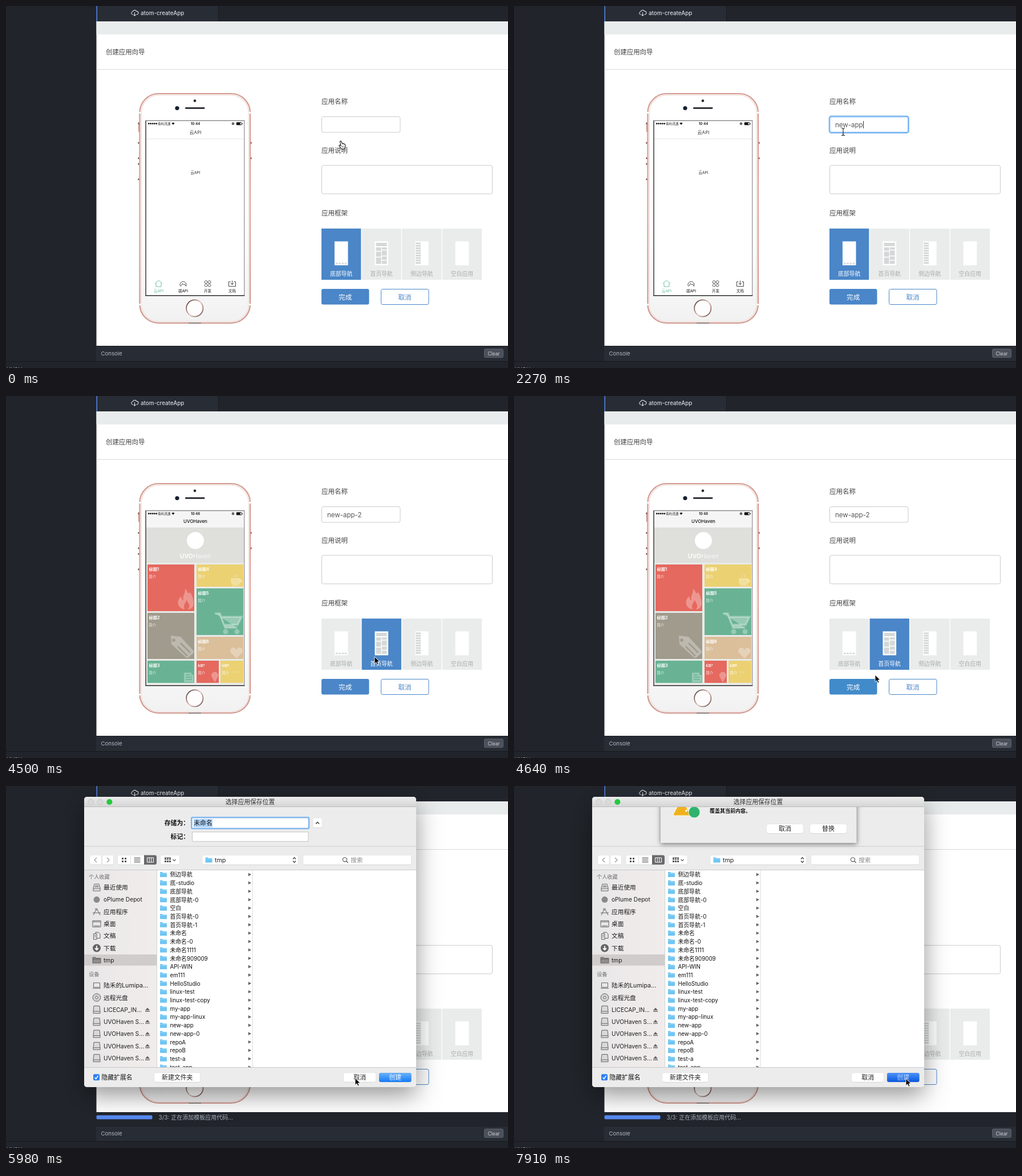
Animation, 880 px wide and 636 px high, one loop 8000 ms. Source, as an HTML page with a canvas:

```html
<!DOCTYPE html>
<html lang="zh-CN">
<head>
<meta charset="utf-8">
<title>创建应用向导</title>
<style>
html, body { margin: 0; width: 100%; height: 100%; overflow: hidden; background: #21252b; }
canvas { display: block; }
</style>
</head>
<body>
<canvas id="stage" width="880" height="636"></canvas>
<script>
const ctx = document.getElementById('stage').getContext('2d');
const LOOP = 8000;
const FONT = 'Inter, "Noto Sans CJK SC", "Noto Sans CJK", sans-serif';
const BLUE = '#4a86c8', GREEN = '#69b394', RED = '#e5695f', YELLOW = '#ebd172';
const BRAND = ['UVO', 'Haven'];
const NAME = BRAND.join('');

// Timed states: each entry holds until the next one starts.
const typed = [[0, ''], [620, 'ne'], [770, 'new'], [1370, 'new-'], [1820, 'new-a'],
  [1970, 'new-ap'], [2120, 'new-app'], [2720, 'new-app-'], [3020, 'new-app-2']];
const focus = [[0, ''], [330, 'name'], [3760, 'note'], [4340, ''], [5090, 'done']];
const pointer = [[0, 583, 237, 'hand'], [150, 577, 221, 'beam'], [3170, 580, 254, 'arrow'],
  [3310, 588, 297, 'beam'], [3460, 592, 322, 'beam'], [3760, 595, 359, 'arrow'],
  [3910, 604, 382, 'arrow'], [4060, 628, 418, 'arrow'], [4200, 648, 443, 'arrow'],
  [4490, 646, 458, 'arrow'], [4640, 633, 490, 'arrow'], [4790, 611, 512, 'arrow'],
  [5540, 612, 513, 'arrow'], [6430, 461, 87, 'beam'], [6730, 484, 128, 'arrow'],
  [6880, 535, 235, 'arrow'], [7020, 598, 365, 'arrow'], [7170, 648, 455, 'arrow'],
  [7310, 679, 503, 'arrow'], [7460, 687, 514, 'arrow']];
const progress = [[0, 0, ''], [5090, 64, '2/3: 正在创建应用目录...'],
  [5540, 84, '3/3: 正在添加模板应用代码...'], [5680, 98, '3/3: 正在添加模板应用代码...']];

function at(list, t) {
  let hit = list[0];
  for (const item of list) if (item[0] <= t) hit = item;
  return hit;
}

function rect(x, y, w, h, color) {
  ctx.fillStyle = color;
  ctx.fillRect(x, y, w, h);
}

function box(x, y, w, h, r, fill, stroke, lw = 1) {
  ctx.beginPath();
  ctx.roundRect(x, y, w, h, r);
  if (fill) { ctx.fillStyle = fill; ctx.fill(); }
  if (stroke) { ctx.strokeStyle = stroke; ctx.lineWidth = lw; ctx.stroke(); }
}

function disc(x, y, r, fill, stroke, lw = 1) {
  box(x - r, y - r, 2 * r, 2 * r, r, fill, stroke, lw);
}

function text(s, x, y, size, color, align = 'left', weight = 400) {
  ctx.font = `${weight} ${size}px ${FONT}`;
  ctx.textAlign = align;
  ctx.fillStyle = color;
  ctx.fillText(s, x, y + size * 0.37);
}

function width(s, size, weight = 400) {
  ctx.font = `${weight} ${size}px ${FONT}`;
  return ctx.measureText(s).width;
}

function shape(d, x, y, fill, stroke, lw = 1) {
  const p = new Path2D(d);
  ctx.save();
  ctx.translate(x, y);
  if (fill) { ctx.fillStyle = fill; ctx.fill(p); }
  if (stroke) { ctx.strokeStyle = stroke; ctx.lineWidth = lw; ctx.stroke(p); }
  ctx.restore();
}

function vertical(y0, y1, ...colors) {
  const g = ctx.createLinearGradient(0, y0, 0, y1);
  colors.forEach((c, i) => g.addColorStop(i / (colors.length - 1), c));
  return g;
}

function drawEditor(t) {
  rect(0, 0, 880, 636, '#21252b');
  rect(159, 0, 213, 27, '#282c34');
  rect(372, 0, 1, 27, '#181a1f');
  rect(158.5, 0, 1.5, 27, '#568af2');
  shape('M-3 3H-4A2.6 2.6 0 0 1-3.6-2A3.8 3.8 0 0 1 3.4-2.6A2.8 2.8 0 0 1 4 3H3M0-1V5M-2 3.2L0 5.2L2 3.2',
    225.5, 12, null, '#d7dae0', 1.1);
  text('atom-createApp', 236, 12.5, 9.8, '#d7dae0', 'left', 500);
  rect(158.5, 27, 722, 570, '#fff');
  rect(158.5, 27, 722, 23, '#e9ecec');
  rect(158.5, 111, 722, 1, '#d8dada');
  text('创建应用向导', 175, 81, 11.4, '#444');

  const [, bar, label] = at(progress, t);
  if (bar) {
    rect(158, 573, 722, 24, '#21252b');
    box(158.5, 578.5, bar, 7, 2, '#568af2');
    text(label, 267.5, 582, 10, '#aab0bc');
  }
  rect(158, 597, 722, 28, '#282c34');
  rect(158, 597, 722, 1, '#1b1e23');
  text('Console', 166.5, 610.5, 9.6, '#b3b9c5');
  box(838.5, 602.5, 33, 15, 2, '#4b505b', '#5b606b');
  text('Clear', 855, 610.5, 8.4, '#d0d3da', 'center');
  rect(0, 624, 880, 1, '#15171b');
  text(NAME, 1, 638.5, 9.5, '#b3b9c5');
}

function drawPhone(second) {
  rect(232, 204, 2, 17, '#c79085');
  for (const y of [205, 239, 266, 276, 303]) rect(231.5, y, 2, 3, '#6d4a45');
  for (const y of [239, 266]) rect(428.5, y, 2, 3, '#6d4a45');
  box(234.5, 154, 193.5, 403, 33, vertical(153, 558, '#fff', '#fff', '#fdfdfd', '#f1f1f2'));
  box(237, 156.5, 188.5, 398, 31, null, '#f1e4e1', 2);
  box(234.4, 154, 193.6, 403, 33, null, vertical(153, 558, '#d49a90', '#dfa79b', '#cf978d'), 2.2);
  for (const y of [186, 523]) {
    rect(232, y, 5, 3, '#fafafa');
    rect(425.5, y, 5, 3, '#fafafa');
  }
  rect(320, 556.5, 22, 1.5, '#777');
  disc(331, 166.5, 2.3, '#20242c');
  disc(300, 179.5, 3.6, '#182030');
  box(314, 178, 34.5, 2.8, 1.4, '#22252b');
  const ring = ctx.createLinearGradient(316, 520, 346, 544);
  ring.addColorStop(0, '#4a2f2d');
  ring.addColorStop(0.5, '#e7c5be');
  ring.addColorStop(1, '#5d3a36');
  disc(330.8, 531, 14.6, '#fdfdfd', ring, 1.7);

  rect(245, 202, 173, 307, '#fff');
  if (second) drawGridScreen(); else drawTabScreen();
  for (let i = 0; i < 5; i++) disc(250.3 + i * 3.4, 206.7, 1.4, '#111');
  text('青屿讯通', 266, 206.8, 5.6, '#222');
  shape('M-2.7-.8Q0-3.2 2.7-.8L0 2Z', 293, 206.8, '#222');
  text(second ? '10:48' : '10:44', 332, 206.8, 6, '#111', 'center', 600);
  disc(398, 206.7, 1.9, '#777', '#333', 0.8);
  box(404, 204.6, 9, 4.4, 0.8, '#111', '#111', 0.6);
  rect(410.5, 205.4, 2, 2.8, '#fff');
  rect(414, 205.8, 1, 2, '#111');
  rect(244.3, 201, 1.5, 308, '#383838');
  rect(244.3, 201, 174, 1, '#666');
  rect(417.3, 201, 1, 308, '#777');
  rect(244.3, 508, 174, 1.5, '#2b2b2b');
}

function drawTabScreen() {
  text('云API', 332, 222.5, 8, '#333', 'center');
  rect(246, 233, 171, 1, '#e6e6e6');
  text('云API', 332, 293, 6.5, '#222', 'center');
  const icons = [
    'M-6.5 0L0-5.5L6.5 0M-4.5-1V5.5H4.5V-1',
    'M-5 4.5A5.5 5.5 0 1 1 5 4.5M-4 5L-1 0L1 2.5L2.5 1L5 5',
    'M-3-5A2.4 2.4 0 1 0-2.9-5ZM3-5A2.4 2.4 0 1 0 3.1-5ZM-3 .8A2.4 2.4 0 1 0-2.9 .8ZM3 .8A2.4 2.4 0 1 0 3.1 .8Z',
    'M-3-3H-6V5H6V-3H3M0-5V2M-2.5-.5L0 2L2.5-.5'];
  ['云API', '端API', '开发', '文档'].forEach((s, i) => {
    const x = 267.5 + i * 43, c = i ? '#333' : '#5fb79b';
    shape(icons[i], x, 487.5, null, c, 0.9);
    text(s, x, 500.5, 6.5, i ? '#222' : c, 'center', i ? 500 : 400);
  });
}

function drawGridScreen() {
  rect(246, 202, 171, 29, '#f5f5f6');
  text(NAME, 332, 220.5, 8, '#111', 'center', 500);
  rect(246, 231, 171, 278, '#e9eae7');
  rect(246, 231, 171, 62, '#dfe0db');
  disc(332, 254, 15, '#fff');
  const size = 10.5, a = width(BRAND[0], size, 600), b = width(BRAND[1], size, 300);
  const x0 = 332 - (a + b) / 2;
  text(BRAND[0], x0, 281.5, size, '#fff', 'left', 600);
  text(BRAND[1], x0 + a, 281.5, size, '#fff', 'left', 300);

  const tiles = [[248, 296, 82, 82, RED], [248, 381, 82, 81, '#a09b8c'], [248, 465, 82, 39, GREEN],
    [334, 296, 82, 39, YELLOW], [334, 338, 82, 82, GREEN], [334, 423, 82, 39, '#dabf9a'],
    [334, 465, 39, 39, RED], [376, 465, 40, 39, YELLOW]];
  const faint = 'rgba(255,255,255,.3)';
  tiles.forEach(([x, y, w, h, c], i) => {
    const small = i > 5;
    rect(x, y, w, h, c);
    text('标题' + (i + 1), x + 2.5, y + 8.5, small ? 4.6 : 7.2, '#fff', 'left', 700);
    text('简介', x + 2.5, y + 21.3, 6.3, 'rgba(255,255,255,.85)');
  });
  shape('M-2-19C4-12 2-8 7-12C15 2 16 17 3 18C9 10 2 7 1 1C-2 8-6 10-3 18C-18 15-16 0-9-5C-8 0-7 1-5 2C-7-7-1-10-2-19Z',
    316, 357, faint);
  shape('M-20-19L-3-17L20 8Q21 10 19 12L10 20Q8 21 6 19L-19-4ZM-15-14A3 3 0 1 0-14.9-14Z', 309, 440, faint);
  shape('M-3-4L14 13M-8 2L9 19', 309, 438, null, '#a09b8c', 2.5);
  shape('M-25-16H-16L-7 9H14M-16-10H22L15 4H-10', 391, 398, faint, faint, 3.5);
  disc(385, 414, 4.5, faint);
  disc(405, 414, 4.5, faint);
  shape('M-8-5H7V0Q6 5 2 5H-3Q-7 5-8 0ZM7-3H10V1H6M-8 7H8M-3-12V-7M1-13V-7', 403, 326, faint, faint, 1.4);
  shape('M0 10L-10 0C-14-8-3-13 0-5C3-13 14-8 10 0Z', 404, 451, faint);
  shape('M-8-8H5V-4H9V9H-8Z', 320, 494, faint);
  shape('M-5-4H2M-5 0H6M-5 4H6', 320, 494, null, GREEN, 1.4);
  shape('M0 10L-5 1A6 6 0 1 1 5 1ZM0-5A2.2 2.2 0 1 1-.1-5Z', 366, 493, faint);
  for (let i = 0; i < 3; i++) disc(397 + i * 5, 485, 1.2, faint);
}

function drawField(x, y, w, h, focused) {
  box(x + 0.5, y + 0.5, w - 1, h - 1, 3, '#fff', focused ? '#7ab4f2' : '#c8caca');
  if (focused) box(x, y, w, h, 3, null, '#83baf3', 2.8);
}

function drawForm(t, second) {
  const focused = at(focus, t)[1], name = at(typed, t)[1];
  text('应用名称', 553, 168, 11.5, '#444');
  text('应用说明', 553, 253.5, 11.5, '#444');
  text('应用框架', 553, 364, 11.5, '#444');
  drawField(553, 194, 138.5, 28.5, focused === 'name');
  drawField(553, 279.5, 300, 51, focused === 'note');
  text(name, 563, 208.8, 11.5, '#555');
  if (focused === 'name') rect(563.5 + width(name, 11.5), 202, 1, 13, '#333');
  if (focused === 'note') rect(563.5, 287, 1, 13, '#333');

  ['底部导航', '首页导航', '侧边导航', '空白应用'].forEach((s, i) => {
    const x = 553 + i * 70.6, on = i === (second ? 1 : 0), ink = '#d5d8d8';
    rect(x, 391, 69.3, 90, on ? BLUE : '#eaecec');
    rect(x + 22.9, 413.5, 23.6, 42, '#fff');
    if (i === 0) for (let k = 0; k < 4; k++) rect(x + 25 + k * 5.2, 451, 3.6, 2.5, ink);
    if (i === 1) {
      rect(x + 25, 416, 19, 6, ink);
      for (const [dx, y, w, h] of [[0, 424, 9, 6], [10.2, 424, 8.8, 4], [0, 431.5, 9, 9], [10.2, 429.5, 8.8, 9],
        [0, 442, 9, 11], [10.2, 440, 8.8, 6], [10.2, 447.5, 8.8, 5.5]]) rect(x + 25 + dx, y, w, h, ink);
    }
    if (i === 2) for (let k = 0; k < 9; k++) rect(x + 24, 415.5 + k * 4.3, 9, 3, ink);
    text(s, x + 34.6, 470, 9.8, on ? '#fff' : '#a9abab', 'center');
  });

  box(553, 497, 83.5, 27.5, 3, t < 4640 ? BLUE : '#428bca');
  if (focused === 'done') box(551.8, 495.8, 86, 30, 4, null, '#8bc0f4', 2.8);
  text('完成', 594.7, 511.3, 11.6, '#fff', 'center');
  box(657.5, 497.5, 83.5, 27, 3, '#fff', BLUE);
  text('取消', 699, 511.3, 11.6, BLUE, 'center');
}

function folder(x, y, color = '#6fc5f2') {
  shape('M-6-4.5H-2L-.8-3.2H6V4.5H-6Z', x, y, color);
  shape('M-6-1.9H6', x, y, null, 'rgba(255,255,255,.5)', 0.6);
}

function button(s, x, y, w, h, fill = '#fff', ink = '#222') {
  box(x, y + 0.5, w, h, 3, '#cfcfcf');
  box(x, y, w, h, 3, fill, 'rgba(0,0,0,.08)', 0.6);
  if (s) text(s, x + w / 2, y + h / 2, 10.9, ink, 'center');
}

function sideLabel(s, y) {
  const latin = /^[\x20-\x7e]+$/.test(s);
  text(s, 171, y, latin ? 10.2 : 10.7, '#1d1d1d');
}

function drawSidebar() {
  const g = ctx.createLinearGradient(137, 0, 264, 0);
  g.addColorStop(0, '#e6e5e5');
  g.addColorStop(0.3, '#ebe9e9');
  g.addColorStop(1, '#f1ecec');
  rect(137, 148, 127, 346, g);
  rect(137, 296, 127, 19.5, '#d1cccc');
  const ink = '#636363';
  const drive = 'M-5-6.5H5L6 3V6.5H-6V3ZM-6 3H6';
  const top = ['M-6 1L-4-6H4L6 1V6H-6ZM-6 2H6M-3-3H3M-4-1H4', '', 'M-6 6L0-6L6 6M-7 2H7M-3-6L0-2',
    'M-7-5.5H7V5.5H-7ZM-7-3.5H7M-5 3.5H5', 'M-5.5-4H0V6H-5.5ZM-2-4V-6.5H3L6-3.5V4H0M-4-1H-1.5M-4 1.5H-1.5',
    '', 'M-7-5H-2L-1-3.5H7V5H-7ZM-7-2H7'];
  const laptop = 'M-5.5-4.5H5.5V3.5H-5.5ZM-7 5H7';
  text('个人收藏', 145, 159.3, 9.2, '#707070', 'left', 500);
  ['最近使用', 'oPlume Depot', '应用程序', '桌面', '文稿', '下载', 'tmp'].forEach((s, i) => {
    const y = 178.3 + i * 21.3;
    if (i === 1) disc(159, y, 5.5, '#8a8a8a');
    else if (i === 5) {
      disc(159, y, 7, ink);
      shape('M0-4V3M-3 .2L0 3.2L3 .2', 159, y, null, '#fff', 1.8);
    } else shape(top[i], 159, y, i === 6 ? '#8f8d8d' : null, ink, 1);
    sideLabel(s, y);
  });
  text('设备', 145, 331, 9.2, '#707070', 'left', 500);
  const disk = NAME + ' S...';
  ['陆禾的Lumipa...', '远程光盘', 'LICECAP_IN...', disk, disk, disk, disk].forEach((s, i) => {
    const y = 350.3 + i * 21.3;
    if (i === 1) {
      disc(159, y, 6.8, '#d2d2d2', ink);
      disc(159, y, 2.2, '#eee', ink);
    } else shape(i ? drive : laptop, 159, y, i ? '#d9d9d9' : null, ink, 1);
    sideLabel(s, y);
    if (i > 1) shape('M-4 1L0-3.5L4 1ZM-4 2.2H4V3.6H-4Z', 248, y, ink);
  });
}

function drawFiles() {
  rect(264, 148, 455, 346, '#fff');
  rect(264, 148, 1, 346, '#d2d2d2');
  rect(431.5, 148, 1, 346, '#dcdcdc');
  ['侧边导航', '底-studio', '底部导航', '底部导航-0', '空白', '首页导航-0', '首页导航-1', '未命名', '未命名-0',
    '未命名1111', '未命名909009', 'API-WIN', 'em111', 'HelloStudio', 'linux-test', 'linux-test-copy', 'my-app',
    'my-app-linux', 'new-app', 'new-app-0', 'repoA', 'repoB', 'test-a', 'test_app'].forEach((s, i) => {
    const y = 155.6 + i * 14.71;
    folder(276, y);
    text(s, 287.5, y + 0.2, 9.8, '#111');
    shape('M-2.3-2.8L3 0L-2.3 2.8Z', 427, y, '#666');
  });
}

function drawToolbar() {
  const ink = '#555';
  button('', 147, 121.5, 20, 16.5);
  button('', 168.5, 121.5, 20, 16.5);
  shape('M2-4L-2 0L2 4', 157, 130, null, '#999', 1.2);
  shape('M-2-4L2 0L-2 4', 179, 130, null, '#999', 1.2);
  button('', 196, 121.5, 68, 16.5);
  rect(218, 122, 1, 16, '#ddd');
  box(242, 121.5, 22, 16.5, [0, 3, 3, 0], '#69696b');
  for (let i = 0; i < 4; i++) rect(203 + (i % 2) * 5, 126 + (i >> 1) * 5, 3, 3, ink);
  shape('M-5.5-4H5.5M-5.5-1.4H5.5M-5.5 1.4H5.5M-5.5 4H5.5', 230, 130, null, ink, 1);
  shape('M-5.5-4H5.5V4H-5.5ZM-1.8-4V4M1.8-4V4', 253, 130, null, '#fff', 1);
  button('', 271, 121.5, 33, 16.5);
  for (let i = 0; i < 6; i++) rect(278 + (i % 3) * 4, 126.5 + (i > 2 ? 4.5 : 0), 3, 3, ink);
  rect(278, 125, 11, 0.8, ink);
  shape('M-2.5-1L0 1.5L2.5-1', 295, 130, null, ink, 1.2);
  button('', 344, 121.5, 168, 16.5);
  folder(355.5, 130);
  text('tmp', 366, 130.3, 10.7, '#222');
  shape('M-2.5-1.5L0-4.5L2.5-1.5M-2.5 1.5L0 4.5L2.5 1.5', 505.5, 130, null, '#444', 1.2);
  button('', 521, 121.5, 189.5, 16.5);
  disc(594, 129.3, 3.6, null, ink, 1.1);
  shape('M0 0L3 3', 596.7, 132, null, ink, 1.2);
  text('搜索', 604, 130.3, 10.7, '#8c8c8c');
}

function drawDialog(t) {
  ctx.save();
  ctx.shadowColor = 'rgba(0,0,0,.42)';
  ctx.shadowBlur = 42;
  ctx.shadowOffsetY = 14;
  box(137, 19, 582, 510, 5, '#ececec');
  ctx.restore();
  ctx.save();
  ctx.beginPath();
  ctx.roundRect(137, 19, 582, 510, 5);
  ctx.clip();

  rect(137, 19, 582, 18, vertical(19, 37, '#ececec', '#d4d4d4'));
  rect(137, 36, 582, 1, '#bcbcbc');
  disc(148.7, 28, 5, '#dadada', '#c6c6c6', 0.8);
  disc(165, 28, 5, '#dadada', '#c6c6c6', 0.8);
  disc(181.3, 28, 5.1, '#27c93f');
  text('选择应用保存位置', 428, 28, 10.8, '#333', 'center');

  text('存储为：', 321, 65.3, 10.8, '#111', 'right', 600);
  text('标记：', 321, 89.3, 10.8, '#111', 'right', 600);
  box(325.3, 55.3, 205.7, 19.5, 2, '#fff', '#83b6ee', 2.6);
  rect(329, 58, 33, 14.5, '#b0d3fb');
  text('未命名', 329.3, 65.3, 10.8, '#111');
  box(326.5, 80.8, 203.5, 16.5, 0, '#fff', '#c3c3c3');
  button('', 538, 56.5, 16, 16.5);
  shape('M-3 1.5L0-1.5L3 1.5', 546, 65, null, '#333', 1.3);
  rect(137, 105.5, 582, 1, '#cdcdcd');
  drawToolbar();
  rect(137, 147, 582, 1, '#c9c9c9');
  drawSidebar();
  drawFiles();

  rect(137, 494, 582, 35, '#ececec');
  rect(137, 494, 582, 1, '#c9c9c9');
  box(153, 506.3, 11, 11, 2, '#2d7ff5');
  shape('M-2.8 0L-.8 2.6L3-3', 158.5, 512, null, '#fff', 1.5);
  text('隐藏扩展名', 167.5, 512.2, 10.8, '#111');
  button('新建文件夹', 260, 504, 80.5, 16);
  button('取消', 592, 504, 56.5, 16);
  const down = t >= 7760;
  button('创建', 654, 504, 56.5, 16,
    down ? vertical(504, 520, '#4d93f8', '#0a57df') : vertical(504, 520, '#69b2fa', '#157af8'),
    down ? '#c4dcfc' : '#fff');
  if (t >= 7910) drawSheet();
  ctx.restore();
}

function drawSheet() {
  ctx.save();
  ctx.beginPath();
  ctx.rect(137, 37, 582, 480);
  ctx.clip();
  ctx.shadowColor = 'rgba(0,0,0,.5)';
  ctx.shadowBlur = 8;
  ctx.shadowOffsetY = 2;
  rect(257, 0, 343.5, 100, '#ececec');
  ctx.shadowColor = 'transparent';
  shape('M-15 15L0-14L15 15Q15 17 13 17H-13Q-15 17-15 15Z', 294, 35, '#f0b21c', '#fff8e0', 1.2);
  disc(302, 43.5, 1.8, '#fff');
  disc(316, 46, 10, '#2fb36d', '#d9efe2', 1);
  text('覆盖其当前内容。', 343, 44, 9, '#111', 'left', 600);
  button('取消', 443, 67, 64, 16);
  button('替换', 519, 67, 64, 16);
  ctx.restore();
}

function drawPointer(t) {
  const [, x, y, kind] = at(pointer, t);
  if (kind === 'arrow') {
    shape('M0 0V12.4L2.9 9.8L5 14.2L7.1 13.2L5.1 8.9H9Z', x, y, '#000', '#fff', 0.9);
  } else if (kind === 'beam') {
    const d = 'M-3-6.5Q0-6.5 0-4.5Q0-6.5 3-6.5M0-4.5V4.5M-3 6.5Q0 6.5 0 4.5Q0 6.5 3 6.5M-1.5 2H1.5';
    shape(d, x, y, null, 'rgba(255,255,255,.8)', 2.4);
    shape(d, x, y, null, '#222', 1.1);
  } else {
    shape('M2.5 1Q4-.5 5 1L6.5 5Q8 4 8.6 5.3Q10 4.6 10.5 6Q12 6 11.8 8L11 11.5V14H5L1 8.8Q.6 7 2.3 7.3L4 8.5Z',
      x, y, '#fff', '#111', 1.1);
    shape('M6.2 9V11.5M8.2 9V11.5', x, y, null, '#111', 0.7);
  }
}

function draw(t) {
  const second = t >= 4340;
  drawEditor(t);
  drawPhone(second);
  drawForm(t, second);
  if (t >= 5980) drawDialog(t);
  drawPointer(t);
}

const start = performance.now();
function tick() {
  draw((performance.now() - start) % LOOP);
  requestAnimationFrame(tick);
}
tick();
</script>
</body>
</html>
```
